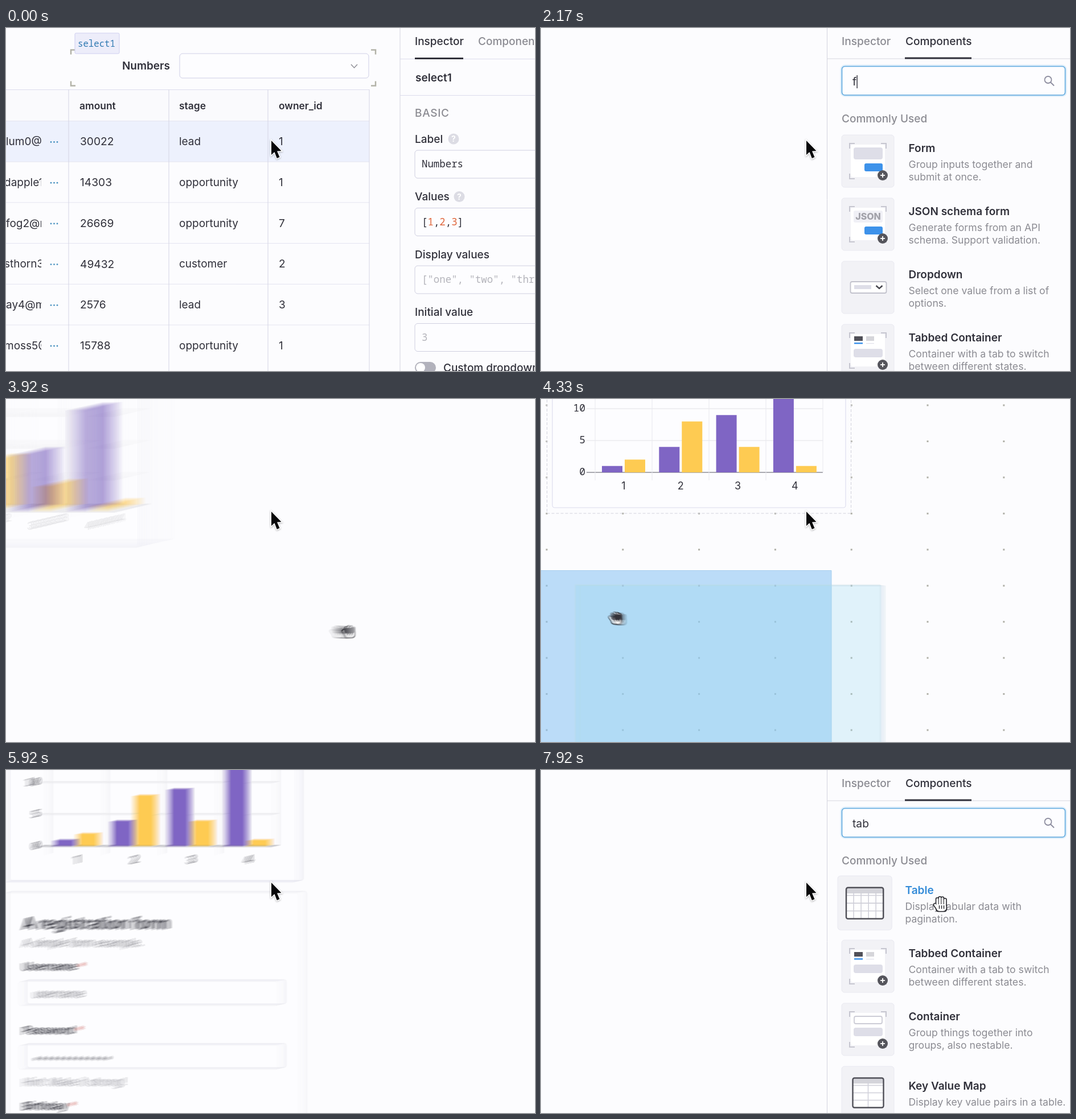
These frames come from a looping animation (929 by 603 pixels, 8 s). An HTML page with a canvas:

```html
<!DOCTYPE html>
<html lang="en">
<head>
<meta charset="utf-8">
<title>App builder tour</title>
<style>
html, body { margin: 0; width: 100%; height: 100%; overflow: hidden; background: #fcfcfe; }
canvas { display: block; }
</style>
</head>
<body>
<canvas id="stage" width="929" height="603"></canvas>
<script>
const W = 929, H = 603, LOOP = 8000;
const BG = '#fcfcfe', INK = '#30303a', GRAY = '#8b8b92', PALE = '#b4b4bb',
      LINE = '#dcdcec', BLUE = '#3d92ea', SOFT = '#dedee8', TILE = '#f2f2f6';
const SANS = 'Inter, sans-serif', MONO = '"Noto Sans Mono", monospace';
const out = document.getElementById('stage').getContext('2d');
const buffer = Object.assign(document.createElement('canvas'), { width: W, height: H });
const c = buffer.getContext('2d');

const clamp = v => Math.min(1, Math.max(0, v));
const ramp = (t, a, b) => clamp((t - a) / (b - a));
const ease = u => u < .5 ? 4 * u ** 3 : 1 - 4 * (1 - u) ** 3;

// Drawing helpers; text is placed by the middle of its capitals.
function text(s, x, y, size = 19, color = INK, weight = 400, font = SANS, align = 'left') {
  c.font = `${weight} ${size}px ${font}`;
  c.textAlign = align;
  c.fillStyle = color;
  c.fillText(s, x, y + size * .36);
}
function box(x, y, w, h, fill, r = 0, stroke, lw = 1) {
  c.beginPath();
  c.roundRect(x, y, w, h, r);
  if (fill) { c.fillStyle = fill; c.fill(); }
  if (stroke) { c.strokeStyle = stroke; c.lineWidth = lw; c.stroke(); }
}
function line(points, color = LINE, lw = 1) {
  c.beginPath();
  for (let i = 0; i < points.length; i += 2) c.lineTo(points[i], points[i + 1]);
  c.strokeStyle = color;
  c.lineWidth = lw;
  c.stroke();
}
function disc(x, y, r, fill) {
  c.beginPath();
  c.arc(x, y, r, 0, 7);
  c.fillStyle = fill;
  c.fill();
}
function ring(x, y, r, color, lw) {
  c.beginPath();
  c.arc(x, y, r, 0, 7);
  c.strokeStyle = color;
  c.lineWidth = lw;
  c.stroke();
}
function corners(x, y, w, h, n, color, lw) {
  for (const [px, sx] of [[x, 1], [x + w, -1]])
    for (const [py, sy] of [[y, 1], [y + h, -1]])
      line([px + n * sx, py, px, py, px, py + n * sy], color, lw);
}
function at(x, y, draw, alpha = 1) {
  if (alpha <= 0) return;
  c.save();
  c.globalAlpha *= alpha;
  c.translate(x, y);
  draw();
  c.restore();
}

// Table page with the inspector.
const rows = [
  ['lum0@', 30022, 'lead', 1], ['dapple1', 14303, 'opportunity', 1],
  ['fog2@r', 26669, 'opportunity', 7], ['sthorn3@', 49432, 'customer', 2],
  ['ay4@m', 2576, 'lead', 3], ['moss5@', 15788, 'opportunity', 1]
];
function field(y, label, help) {
  text(label, 718, y, 19, INK, 500);
  if (help) {
    disc(help, y, 9.5, '#dcdce4');
    text('?', help, y, 14, '#fff', 700, SANS, 'center');
  }
  box(718, y + 20, 400, 49, '#fdfdff', 5, '#cfcfe0');
}
function tablePage() {
  box(0, 109, 638, 54, '#fafafd');
  box(0, 164, 638, 71, '#edf1fd');
  line([0, 108.5, 638, 108.5]);
  rows.forEach(([mail, amount, stage, owner], i) => {
    const y = 199.5 + i * 71.7;
    line([0, 163.5 + i * 71.7, 638, 163.5 + i * 71.7], '#e4e4f0');
    c.save();
    c.beginPath(); c.rect(0, y - 20, 62, 40); c.clip();
    text(mail, i % 2 ? -3 : 0, y);
    c.restore();
    for (const x of [79, 84.5, 90]) disc(x, y + 1, 1.4, '#4a92c0');
    text(amount, 130, y, 19.2);
    text(stage, 304, y);
    text(owner, 479, y);
  });
  for (const x of [110, 286, 460, 638]) line([x, 108, x, 610], '#d4d4e4');
  text('amount', 129, 137, 17.4, INK, 600);
  text('stage', 304, 137, 17.4, INK, 600);
  text('owner_id', 479, 137, 17.4, INK, 600);

  corners(114, 38.5, 535, 63, 8, '#b2b2a8', 2.5);
  box(121, 9, 78, 36, '#ededfa', 2, '#cfcff0');
  text('select1', 126, 27, 15.7, '#2f79b2', 400, MONO);
  text('Numbers', 204, 66.5, 18.9, INK, 600);
  box(305, 45, 332, 43, '#fdfdff', 5, '#cfcfe6');
  line([606, 64, 611.5, 70, 617, 64], '#909098', 1.5);

  line([692, 0, 692, 610], '#d4d4e0');
  text('Inspector', 718, 23.5, 19, INK, 500);
  text('Components', 829, 23.5, 19, GRAY, 500);
  line([692, 54.5, 1400, 54.5]);
  box(718, 52, 85, 3, INK);
  text('select1', 719, 87, 19, INK, 600);
  line([692, 118.5, 1400, 118.5]);
  c.letterSpacing = '.7px';
  text('BASIC', 718, 149, 19, GRAY, 500);
  c.letterSpacing = '0px';
  field(195, 'Label', 786);
  text('Numbers', 730, 239, 17.4, INK, 400, MONO);
  field(296.5, 'Values', 796);
  [...'[1,2,3]'].forEach((ch, i) =>
    text(ch, 730 + i * 10.44, 340.5, 17.4, i % 2 && i < 6 ? '#e0663c' : INK, 400, MONO));
  field(398, 'Display values');
  text('["one", "two", "three"]', 730, 442, 17.4, PALE, 400, MONO);
  field(499.5, 'Initial value');
  text('3', 730, 543.5, 17.4, PALE, 400, MONO);
  box(718, 587, 37, 20, '#b2b2bc', 10);
  disc(728, 597, 8, '#fff');
  text('Custom dropdown', 768, 597.5, 19, INK, 500);
}

// Icons on a 92 px tile.
const brackets = () => corners(14, 15, 64, 62, 9, '#c6c6d0', 2);
function card() {
  brackets();
  box(16, 17, 60, 57, '#fff', 4);
}
function badge() {
  disc(72, 71, 9, '#55555c');
  line([68, 71, 76, 71], '#fff', 1.8);
  line([72, 67, 72, 75], '#fff', 1.8);
}
function submit() {
  box(40, 50, 32, 14, BLUE, 3);
  badge();
}
function gridIcon(x, y, w, h, cols, n) {
  box(x, y, w, h, '#fff', 3);
  box(x, y, w, h / n * .75, '#d4d4da', 2);
  for (let i = 1; i < cols; i++) line([x + w * i / cols, y + 8, x + w * i / cols, y + h], '#cfcfd8', 1.5);
  for (let i = 1; i < n; i++) line([x, y + h * i / n, x + w, y + h * i / n], '#cfcfd8', 1.5);
  box(x, y, w, h, null, 3, '#505058', 2.4);
}
const items = {
  form: ['Form', 'Group inputs together and\nsubmit at once.', () => {
    card(); box(21, 22, 51, 21, SOFT, 4); submit();
  }],
  json: ['JSON schema form', 'Generate forms from an API\nschema. Support validation.', () => {
    card(); box(21, 22, 51, 21, '#f0f0f6', 3);
    text('JSON', 46.5, 32.5, 16, '#a2a2aa', 800, SANS, 'center'); submit();
  }],
  dropdown: ['Dropdown', 'Select one value from a list of\noptions.', () => {
    box(15.5, 36, 63, 20, '#fff', 3, '#c2c2cc', 1.8);
    box(22, 42, 30, 7, SOFT);
    line([60.5, 43, 66, 48, 71.5, 43], '#44444c', 2.4);
  }],
  tabbed: ['Tabbed Container', 'Container with a tab to switch\nbetween different states.', () => {
    card(); box(22, 21, 15, 8, '#505058'); box(43, 21, 14, 8, '#d6d6da');
    box(22, 32, 15, 2.5, BLUE); box(43, 33, 14, 1, SOFT);
    box(21, 43, 51, 15, SOFT, 4); badge();
  }],
  container: ['Container', 'Group things together into\ngroups, also nestable.', () => {
    card(); box(22, 23, 49, 13, '#fff', 3, '#ccccd6', 1.8); box(21, 43, 51, 15, SOFT, 4); badge();
  }],
  text: ['Text', 'Supports markdown or HTML.', () => {
    brackets(); text('A', 30, 33, 29, '#505058', 700, SANS, 'center');
    box(45, 23, 27, 7, SOFT); box(45, 36, 27, 6, SOFT);
    box(20, 50, 52, 6, SOFT); box(20, 63, 52, 6, SOFT);
  }],
  input: ['Text Input', 'Control other components or\nqueries with text.', () => {
    for (const y of [21.5, 50]) box(15.5, y, 63, 20, '#fff', 3, '#c8c8d2', 1.8);
    box(21, 28, 17, 6, SOFT); box(37, 56, 33, 6, SOFT);
    line([46, 26, 46, 37], INK, 1.6);
    line([43, 26, 49, 26], INK, 1.4); line([43, 37, 49, 37], INK, 1.4);
    ring(25.5, 59, 3.8, '#b4b4be', 1.5); line([28, 62, 32, 66], '#b4b4be', 1.5);
  }],
  button: ['Button', 'Trigger actions like run queries,\nexport data, or open other apps.', () => {
    box(19, 35, 54, 22, BLUE, 2);
    text('Action', 46, 46, 13, '#fff', 600, SANS, 'center');
  }],
  table: ['Table', 'Display tabular data with\npagination.', () => gridIcon(14.5, 20, 63, 53, 5, 4)],
  map: ['Key Value Map', 'Display key value pairs in a table.', () => gridIcon(19.5, 20.5, 54, 52, 2, 4)]
};

// Search states: start time, query, items shown.
const states = [
  [0, '', 'text input dropdown button'],
  [2130, 'f', 'form json dropdown tabbed'],
  [2290, 'fo', 'form json dropdown'],
  [2400, 'for', 'form json dropdown'],
  [2540, 'form', 'form json'],
  [5000, '', 'text input dropdown button'],
  [7060, 't', 'text input table tabbed'],
  [7220, 'ta', 'table tabbed container map'],
  [7380, 'tab', 'table tabbed container map']
];
function item(key, i, hover) {
  const [title, desc, icon] = items[key], y = 188 + i * 111;
  const lines = desc.split('\n'), top = lines.length > 1 ? 23.5 : 34.5;
  at(528 - 7 * hover, y - 2 * hover, () => {
    c.scale(1 + .035 * hover, 1 + .035 * hover);
    box(0, 0, 92, 92, TILE, 5, '#e9e9f1');
    icon();
  });
  const x = 645.5 - 6 * hover;
  text(title, x, y + top, 19, hover > .5 ? '#338bd8' : INK, 600);
  lines.forEach((s, n) => text(s, x, y + top + 27.7 + n * 22, 17.6, GRAY));
}
function componentPanel(t) {
  const [since, query, list] = states.findLast(s => t >= s[0]);
  const focus = t < 5000 ? ramp(t, 2040, 2120) : ramp(t, 6480, 6640);
  line([502.5, -300, 502.5, 900], '#d4d4de');
  line([502, 54, 1300, 54], '#d6d6de');
  text('Inspector', 528, 23, 19.1, GRAY, 500);
  text('Components', 640, 23, 19.1, INK, 500);
  box(639, 51.5, 117, 3, INK);

  box(528.5, 67.5, 392, 50.5, '#fdfdff', 5, '#cfcfe0');
  at(0, 0, () => {
    box(527, 66, 395, 53.5, null, 7, '#dcedfa', 3);
    box(528.5, 67.5, 392, 50.5, null, 5, '#5fa9de', 1.6);
  }, focus);
  if (query) text(query, 547, 94, 19.2); else text('Search components', 547, 94, 19.2, PALE);
  if (query && t - since < 150) {
    const x = 548 + c.measureText(query).width;
    line([x, 83, x, 106], INK, 1.4);
  }
  ring(890.5, 91, 6, '#8e8ea0', 1.8);
  line([895, 95.5, 901, 101.5], '#8e8ea0', 2);
  text('Commonly Used', 528, 159.5, 19, GRAY, 500);

  const hoverIndex = t < 5000 ? 1 : 0;
  const hover = t < 5000 ? ramp(t, 2780, 2920) : ramp(t, 7800, 7910);
  list.split(' ').forEach((key, i) => item(key, i, i === hoverIndex ? hover : 0));
}

// Canvas page with the chart and the dropped form.
function chart() {
  box(20, -110, 515, 301, '#fdfdff', 4, '#dedeee', 1.2);
  for (let v = 0; v <= 20; v += 5) {
    const y = 129 - v * 11.2;
    line([80, y, 495, y], v ? '#e2e2e6' : '#8e8e96', v ? 1 : 1.6);
    text(v, 78, y - 1, 18, INK, 400, MONO, 'right');
  }
  for (let i = 0; i < 5; i++) line([95 + i * 100, -100, 95 + i * 100, i < 4 ? 143 : 129], '#e8e8ee');
  [[1, 2], [4, 8], [9, 4], [16, 1]].forEach((pair, i) => {
    pair.forEach((v, n) =>
      box(107 + i * 100.3 + n * 40, 129 - v * 11.2, 36, v * 11.2, n ? '#fecb52' : '#7f65c4'));
    text(i + 1, 145 + i * 100.3, 153, 18, INK, 400, SANS, 'center');
  });
}
function formField(y, label, value) {
  text(label, 50, y, 18.8, INK, 600);
  const end = 55 + c.measureText(label).width;
  text('*', end, y, 18.8, '#e2645c', 500);
  box(50, y + 24.5, 455, 42.5, '#fdfdff', 4, '#e4e4ee');
  text(value, 69, y + 48, 18.5, GRAY);
}
function form() {
  box(20, 210, 521, 460, '#fdfdff', 4, '#ececf4');
  text('A registration form', 50, 265, 28.3, INK, 600);
  text('A simple form example.', 50, 299.5, 18.8, GRAY);
  formField(341, 'Username', 'username');
  formField(453, 'Password', '•'.repeat(13));
  text('Hint: Make it strong!', 50, 544, 18.8, '#a2a2aa');
  formField(586, 'Birthday', '');
}
function grid() {
  for (let x = 10; x < 1000; x += 133.8)
    for (let y = 11; y < 660; y += 63.45) box(x - 1.5, y - 1.5, 3, 3, '#b0b0a8');
  c.setLineDash([5, 3]);
  box(10.5, -120, 534, 321, null, 0, '#d2d2dc');
  c.setLineDash([]);
}
function canvasPage(t) {
  at(0, 0, grid, t < 4500 ? ramp(t, 4160, 4300) : 1 - ramp(t, 4600, 4900));
  chart();
  at(0, 0, form, ramp(t, 4640, 4820));
  at(0, 0, () => {
    const [x, y] = handAt(t);
    box(-10, 301.5, 520, 400, 'rgba(135,195,245,.55)', 0, '#a9d0ee');
    box(x - 71, y - 56, 536, 400, 'rgba(150,215,235,.28)', 0, '#c4dfec');
  }, t < 4500 ? ramp(t, 4160, 4300) : 1 - ramp(t, 4560, 4700));
}

// Hand pointer path: time, x, y.
const path = [
  [2780, 636, 362], [3000, 655, 354], [3170, 700, 345], [3500, 705, 342], [3920, 601, 408],
  [4170, 230, 392], [4330, 133, 384], [4600, 72, 350], [5000, 60, 300],
  [7750, 690, 290], [7900, 702, 236], [8000, 702, 236]
];
function handAt(t) {
  const i = Math.max(1, path.findIndex(p => p[0] >= t));
  const [t0, x0, y0] = path[i - 1], [t1, x1, y1] = path[i], u = ramp(t, t0, t1);
  return [x0 + (x1 - x0) * u, y0 + (y1 - y0) * u];
}
function hand(grab) {
  const top = grab ? -6 : -11;
  for (const [color, grow] of [['#26262c', 1.6], ['#fff', 0]]) {
    c.lineCap = 'round';
    [-6, -1.5, 3, 7.5].forEach((x, i) => line([x, top + [2, 0, .5, 3][i], x, 4], color, 3.4 + grow * 2));
    line([-10, 1, -5, 8], color, 3.6 + grow * 2);
    c.lineCap = 'butt';
    box(-7.5 - grow, 0 - grow, 17 + grow * 2, 12 + grow * 2, color, 5);
  }
  for (const x of [-2.5, 1.5, 5.5]) line([x, 2, x, 8], '#26262c', 1.4);
  if (grab) box(-8, -5, 17, 10, '#33333a', 3);
}

function scene(t) {
  c.globalAlpha = 1;
  box(0, 0, W, H, BG);
  if (t < 2110) {
    const k = ease(ramp(t, 1630, 2100));
    at(-900 * k, 0, tablePage);
    at(900 * (1 - k), 0, () => componentPanel(t));
  } else {
    const k = t < 5000 ? 1 - ease(ramp(t, 3500, 4250)) : ease(ramp(t, 5830, 6330));
    if (k < 1) at(-800 * k, 185 * k, () => canvasPage(t));
    if (k > 0) at(800 * (1 - k), -185 * (1 - k), () => componentPanel(t));
  }
  const shown = t < 6000 ? ramp(t, 2780, 2830) * (1 - ramp(t, 4850, 5000)) : ramp(t, 7800, 7880);
  at(...handAt(t), () => hand(t > 3200 && t < 4600), shown);
}
function pointer() {
  out.save();
  out.translate(466, 198);
  out.beginPath();
  for (const [x, y] of [[0, 0], [0, 25], [5.5, 20], [9.8, 31], [14.5, 29], [10, 18.5], [17.5, 18]]) out.lineTo(x, y);
  out.closePath();
  out.shadowColor = 'rgba(0,0,0,.3)';
  out.shadowBlur = 3;
  out.shadowOffsetY = 1;
  out.strokeStyle = '#fff';
  out.lineWidth = 3;
  out.stroke();
  out.shadowColor = 'transparent';
  out.fillStyle = '#08080a';
  out.fill();
  out.restore();
}

// Camera moves are averaged over a short shutter.
const moves = [[1630, 2100], [3500, 4420], [5830, 6330]], SHUTTER = 26;
function frame(now) {
  const t = now % LOOP;
  const samples = moves.some(([a, b]) => t > a && t < b) ? 24 : 1;
  for (let i = 0; i < samples; i++) {
    scene(t + (samples > 1 ? SHUTTER * (i / (samples - 1) - .5) : 0));
    out.globalAlpha = 1 / (i + 1);
    out.drawImage(buffer, 0, 0);
  }
  out.globalAlpha = 1;
  pointer();
  requestAnimationFrame(frame);
}
requestAnimationFrame(frame);
</script>
</body>
</html>
```
